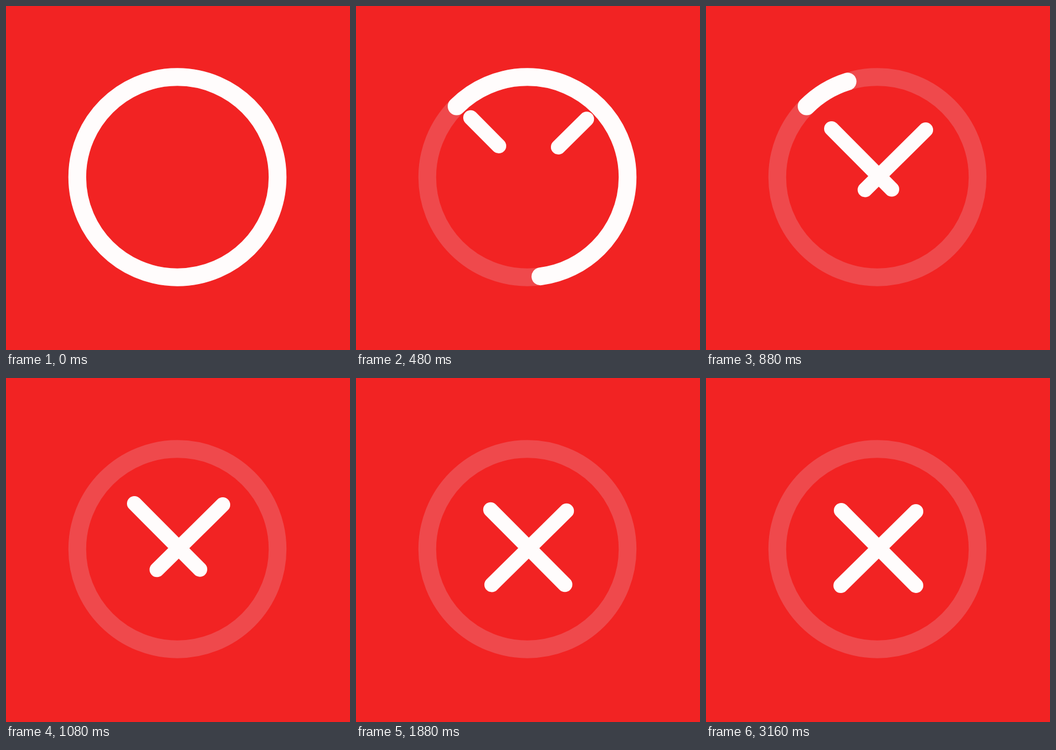
An HTML page for the animation above (3.2 s loop, 600 by 600 pixels).

```html
<!DOCTYPE html>
<html lang="en">
<head>
<meta charset="utf-8">
<title>Closing ring</title>
<style>
  html, body { margin: 0; width: 100%; height: 100%; overflow: hidden; background: #f22323; }
  svg { display: block; width: 100vw; height: 100vh; }
  circle, line { fill: none; stroke: #fffcfc; stroke-linecap: round; }
  circle { stroke-width: 31px; }
  line { stroke-width: 26px; }
  #track { stroke: #ef494c; }
</style>
</head>
<body>
<svg viewBox="0 0 600 600">
  <circle id="track" cx="299" cy="298.5" r="174.7"/>
  <circle id="arc" cx="299" cy="298.5" r="174.7" pathLength="360" transform="rotate(-135 299 298.5)"/>
  <line id="down"/>
  <line id="up"/>
</svg>
<script>
const LOOP = 3200, TICK = 40, STEP = 50;
const $ = id => document.getElementById(id);
const arc = $('arc'), down = $('down'), up = $('up');

// [time, x of the tail, x of the head] along the falling stroke
const KEYS = [
  [100, 176, 176], [250, 182, 190], [350, 191, 217], [450, 200, 249],
  [650, 212, 300.5], [850, 219, 324], [1050, 224, 338], [1250, 227.8, 348.3],
  [1450, 230.7, 356], [1750, 234, 363], [2100, 236, 366]
];

const clamp = u => Math.min(1, Math.max(0, u));
const smooth = u => u * u * (3 - 2 * u);

function slope(i, col) {
  if (i === 0 || i === KEYS.length - 1) return 0;
  const a = KEYS[i - 1], b = KEYS[i + 1];
  return (b[col] - a[col]) / (b[0] - a[0]);
}

// cubic Hermite curve through the keys
function track(t, col) {
  const last = KEYS.length - 1;
  if (t <= KEYS[0][0]) return KEYS[0][col];
  if (t >= KEYS[last][0]) return KEYS[last][col];
  const i = KEYS.findIndex(k => k[0] > t) - 1;
  const a = KEYS[i], b = KEYS[i + 1], d = b[0] - a[0];
  const u = (t - a[0]) / d, s = smooth(u);
  return a[col] * (1 - s) + b[col] * s +
    d * u * (1 - u) * (slope(i, col) * (1 - u) - slope(i + 1, col) * u);
}

function setLine(line, place, tail, head) {
  const [x1, y1] = place(tail), [x2, y2] = place(head);
  Object.entries({ x1, y1, x2, y2 }).forEach(([k, v]) => line.setAttribute(k, v));
}

const falling = x => [x, 231 + (x - 236) * 1.007];
const rising = x => [366 - (x - 236) * 1.006, 233 + (x - 236) * 0.993];

function draw(t) {
  const sweep = 360 * (1 - smooth(clamp((t - 20) / 1000)));
  arc.style.display = sweep > 0 ? '' : 'none';
  arc.setAttribute('stroke-dasharray', `${sweep} 720`);

  const tail = track(t, 1), head = track(t, 2);
  const shown = t > KEYS[0][0] ? '' : 'none';
  down.style.display = up.style.display = shown;
  setLine(down, falling, tail, head);
  setLine(up, rising, tail, head);
}

// poses advance every STEP ms, shown on the next TICK
function pose(ms) {
  const shown = Math.floor((ms % LOOP) / TICK) * TICK;
  return Math.floor(shown / STEP) * STEP;
}

const start = performance.now();
function frame() {
  draw(pose(performance.now() - start));
  requestAnimationFrame(frame);
}
frame();
</script>
</body>
</html>
```
